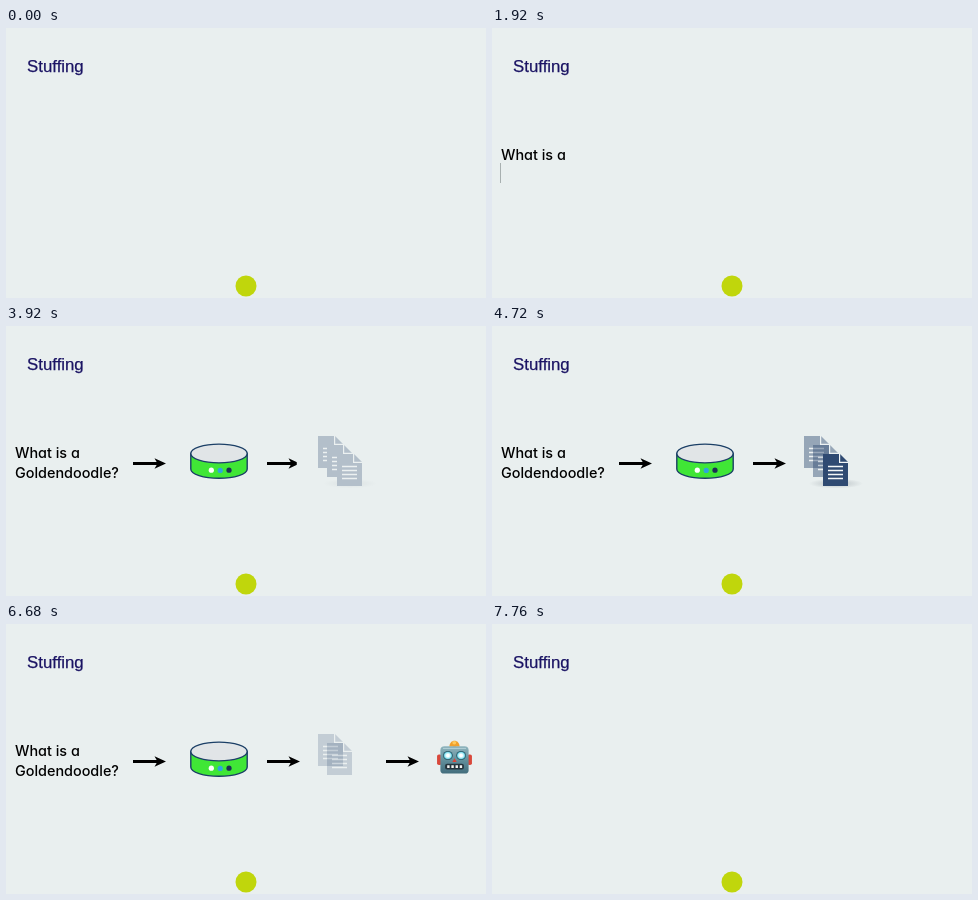
Write an HTML page that moves like this. It is 480 by 270 pixels and loops after 7800 ms.

```html
<!DOCTYPE html>
<html lang="en">
<head>
<meta charset="utf-8">
<title>Stuffing</title>
<style>
  html, body { margin: 0; width: 100%; height: 100%; overflow: hidden; background: #e9efef; }
  svg { display: block; width: 100vw; height: 100vh; }
  .title { font: 16.8px "Liberation Sans", Arial, sans-serif; fill: #1b1464; stroke: #1b1464; stroke-width: .25; }
  .typed { font: 450 14.4px Inter, Lato, sans-serif; font-feature-settings: "cv11"; fill: #000; }
</style>
</head>
<body>
<svg viewBox="0 0 480 270">
  <defs>
    <g id="page">
      <path d="M0 0H17L25 8V32H0Z" fill="#2f4a72"/>
      <path d="M16.6 0V8.4H25" fill="none" stroke="#f4f7f8" stroke-width="1.2"/>
      <path d="M5 12.5H20M5 16.5H20M5 20.5H20M5 24.5H20" stroke="#f4f7f8" stroke-width="1.5"/>
    </g>
    <g id="arrow">
      <path d="M0 0H25" stroke="#000" stroke-width="2.8"/>
      <path d="M33 0L21.5-5.2L24.5 0L21.5 5.2Z"/>
    </g>
    <linearGradient id="steel" x2="0" y2="1">
      <stop offset="0" stop-color="#8fb4bd"/>
      <stop offset=".55" stop-color="#5f8d99"/>
      <stop offset="1" stop-color="#426d7c"/>
    </linearGradient>
    <radialGradient id="glow">
      <stop offset=".3" stop-color="#fff"/>
      <stop offset=".75" stop-color="#9be9f5"/>
      <stop offset="1" stop-color="#3ba3b8"/>
    </radialGradient>
    <radialGradient id="shade">
      <stop offset="0" stop-color="#5a6670" stop-opacity=".35"/>
      <stop offset="1" stop-color="#5a6670" stop-opacity="0"/>
    </radialGradient>
  </defs>
  <rect width="480" height="270" fill="#e9efef"/>
  <text class="title" x="21.1" y="44">Stuffing</text>
  <circle cx="240" cy="258" r="10.5" fill="#c0d60c"/>

  <text class="typed" id="line1" x="9" y="132" xml:space="preserve"></text>
  <text class="typed" id="line2" x="9" y="152.3" xml:space="preserve"></text>
  <rect id="caret" width="1" height="20" fill="#a8b0b0"/>

  <g id="arrows"></g>

  <g id="drum">
    <path d="M184.8 127.5V143C184.8 148.3 197.4 152.3 213 152.3S241.2 148.3 241.2 143V127.5Z"
      fill="#40e636" stroke="#1b3f66" stroke-width="1.4"/>
    <ellipse cx="213" cy="127.5" rx="28.2" ry="9.4" fill="#e1e5e7" stroke="#1b3f66" stroke-width="1.4"/>
    <circle cx="205.3" cy="144.2" r="2.6" fill="#fff"/>
    <circle cx="214.2" cy="144.4" r="2.6" fill="#2fa4dc"/>
    <circle cx="223" cy="144.2" r="2.6" fill="#1b2f55"/>
  </g>

  <g id="robot">
    <rect x="447" y="121" width="3" height="5" fill="#b98a3d"/>
    <path d="M443.6 124.5C443.6 116 453.4 116 453.4 124.5Z" fill="#f0a02c"/>
    <circle cx="448.3" cy="120.3" r="1.8" fill="#ffc95a"/>
    <rect x="431.8" y="132.5" width="4.5" height="11" rx="1.8" fill="#d9483b"/>
    <rect x="460.7" y="132.5" width="4.5" height="11" rx="1.8" fill="#d9483b"/>
    <path d="M435 128Q435 124 439 124H458Q462 124 462 128V149Q462 152.5 458.5 152.5H438.5Q435 152.5 435 149Z"
      fill="url(#steel)"/>
    <path d="M437.5 126.2H459.5" stroke="#b5d2d8" stroke-width="1"/>
    <circle cx="442.2" cy="133.6" r="4.7" fill="#2f5966"/>
    <circle cx="454.8" cy="133.6" r="4.7" fill="#2f5966"/>
    <circle cx="442.2" cy="133.6" r="4" fill="url(#glow)"/>
    <circle cx="454.8" cy="133.6" r="4" fill="url(#glow)"/>
    <path d="M448.5 136.5L450.6 140.3H446.4Z" fill="#dc4437"/>
    <rect x="439.5" y="142.2" width="18" height="6" rx="2" fill="#25343c"/>
    <path d="M441.5 145.2H456" stroke="#f2f5f3" stroke-width="3" stroke-dasharray="2.3 1.7"/>
  </g>

  <g id="pages">
    <ellipse id="shadow" cx="344" cy="157.5" rx="27" ry="5" fill="url(#shade)"/>
    <use id="back1" href="#page" x="312" y="110"/>
    <use id="back2" href="#page" x="321" y="119"/>
    <use id="front" href="#page"/>
  </g>
</svg>
<script>
const LOOP = 7800, STEP = 40, CLEAR = 7760;
const $ = id => document.getElementById(id);
const ramp = (t, a, b) => Math.min(1, Math.max(0, (t - a) / (b - a)));
const fade = (id, v) => $(id).setAttribute("opacity", v);

// Two typed lines: text, start time, time per key, caret top
const lines = [
  { el: $("line1"), text: "What is a ", from: 960, key: 80, top: 115 },
  { el: $("line2"), text: "Goldendoodle?", from: 1960, key: 46, top: 135 }
];

// Arrows wiped in from the left: x, start, end
const arrows = [[127, 3120, 3520], [261, 3600, 3960], [380, 5040, 5400]].map(([x, from, to], i) => {
  $("arrows").insertAdjacentHTML("beforeend",
    `<clipPath id="wipe${i}"><rect x="${x}" y="130" height="15" width="0"/></clipPath>
     <g clip-path="url(#wipe${i})"><use href="#arrow" x="${x}" y="137.5"/></g>`);
  return { rect: $("wipe" + i).firstElementChild, from, to };
});

const bezier = (s, p) => {
  const r = 1 - s;
  return r * r * r * p[0] + 3 * s * r * r * p[1] + 3 * s * s * r * p[2] + s * s * s * p[3];
};
const pathX = [331, 331, 406, 436.5], pathY = [128, 103, 76, 122];

function drawText(t) {
  const shown = lines.map(l => {
    const n = t < l.from ? 0 : Math.floor((t - l.from) / l.key) + 1;
    const part = t < CLEAR ? l.text.slice(0, n) : "";
    if (l.el.textContent !== part) l.el.textContent = part;
    return part;
  });
  const row = t < 1760 ? 0 : 1;
  const { el, top } = lines[row];
  const x = shown[row] ? 9 + el.getComputedTextLength() : 8;
  $("caret").setAttribute("x", Math.round(x));
  $("caret").setAttribute("y", top);
  fade("caret", ramp(t, 520, 640) * (1 - ramp(t, 3000, 3160)));
}

function drawPages(t) {
  fade("pages", t < CLEAR ? ramp(t, 3840, 4120) : 0);
  const dim = 1 - 0.8 * ramp(t, 4160, 4960);
  fade("back1", dim);
  fade("back2", dim);
  fade("shadow", 1 - ramp(t, 5640, 5800));
  const u = ramp(t, 5720, 6600);
  const s = u * (2 - u);
  $("front").setAttribute("x", bezier(s, pathX));
  $("front").setAttribute("y", bezier(s, pathY));
  fade("front", 1 - ramp(t, 6400, 6620));
}

// One hop, squashed a little at take-off and landing
function drawRobot(t) {
  const u = ramp(t, 6620, 7300);
  const lift = 39.5 * Math.sin(Math.PI * u) ** 2;
  const squash = 0.05 * (Math.sin(Math.PI * ramp(u, 0, 0.25)) + Math.sin(Math.PI * ramp(u, 0.8, 1)));
  $("robot").setAttribute("transform",
    `translate(448.5 ${152.5 - lift}) scale(${1 + squash} ${1 - squash}) translate(-448.5 -152.5)`);
  fade("robot", t < CLEAR ? ramp(t, 5360, 5680) : 0);
}

function draw(t) {
  drawText(t);
  for (const a of arrows) a.rect.setAttribute("width", t < CLEAR ? 33.5 * ramp(t, a.from, a.to) : 0);
  fade("drum", t < CLEAR ? ramp(t, 3400, 3640) : 0);
  drawPages(t);
  drawRobot(t);
}

const start = performance.now();
function tick() {
  const t = (performance.now() - start) % LOOP;
  draw(Math.floor(t / STEP) * STEP);
  requestAnimationFrame(tick);
}
tick();
</script>
</body>
</html>
```
